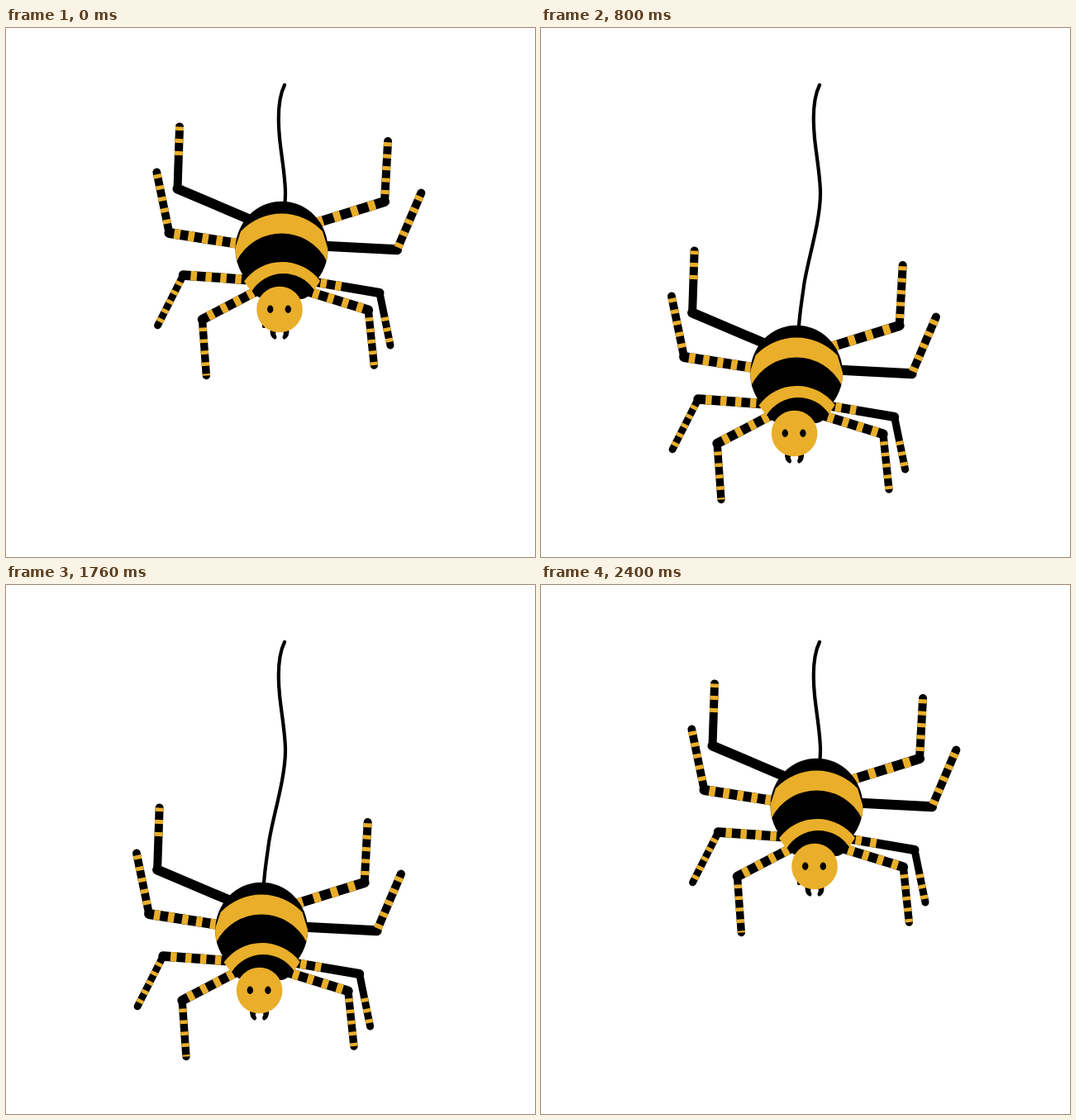
Recreate the animation shown at these times as an HTML page. Size 640 by 640 pixels, loop 2.48 s.

```html
<!DOCTYPE html>
<html lang="en">
<head>
<meta charset="utf-8">
<title>Spider on a thread</title>
<style>
html, body { margin: 0; width: 100%; height: 100%; overflow: hidden; background: #fff; }
svg { display: block; width: 100vw; height: 100vh; }
</style>
</head>
<body>
<svg viewBox="0 0 640 640">
  <path d="M337 69C329 85 329 112 331 133S338 180 338 200C338 235 322 283 318 312S313 345 312 361"
        fill="none" stroke="#000" stroke-width="4.2" stroke-linecap="round"/>
  <g id="spider">
    <g id="legs" fill="none" stroke-linejoin="round"></g>
    <clipPath id="round"><ellipse cx="333.5" cy="267.5" rx="56" ry="57.8"/></clipPath>
    <ellipse cx="333.5" cy="267.5" rx="56" ry="57.8"/>
    <path d="M297 318A45 45 0 0 1 373 317Q367 326 358 328L306 326Z"/>
    <g fill="#e9ae2a">
      <path clip-path="url(#round)" d="M284 246A68 68 0 0 1 383 246L394 282H388A61 61 0 0 0 279 282H272Z"/>
      <path d="M288 306.5A57 57 0 0 1 380 306L373 317A45 45 0 0 0 297 319Z"/>
    </g>
    <g stroke="#000" stroke-width="1.4" stroke-linejoin="round">
      <path id="fangL" d="M320.5 364Q319 373 325.5 376Q328 374.5 325.5 371L326 364Z"/>
      <path id="fangR" d="M341.5 364Q343 373 336.5 376Q334 374.5 336.5 371L336 364Z"/>
    </g>
    <circle cx="331" cy="340.5" r="27.8" fill="#e9ae2a"/>
    <ellipse cx="319.7" cy="340.2" rx="3.7" ry="4.7"/>
    <ellipse cx="341.3" cy="340.2" rx="3.7" ry="4.7"/>
  </g>
</svg>
<script>
const STEP = 80, LOOP = 2480, LAST = 30, DROP = 150, YELLOW = "#e9ae2a";
const $ = id => document.getElementById(id);

// hip, knee, tip, swing in radians, widths, stripes [start, period, width, count] from the knee
const legs = [
  { hip: [299.5, 233.5], knee: [207.5, 194.5], tip: [210, 119.5], swing: .05, w: [12, 10], shin: [40.5, 15, 5, 3] },
  { hip: [281, 261], knee: [197.5, 248], tip: [182.3, 174.5], swing: .068, w: [12, 9.8], thigh: [6, 17.2, 7.5, 5], shin: [11.5, 14, 5, 5] },
  { hip: [283, 304], knee: [214.5, 299], tip: [183.5, 360], swing: .14, w: [11.5, 8.8], thigh: [9, 18, 7.5, 4], shin: [9, 12.5, 4.5, 5] },
  { hip: [297, 321.5], knee: [237.5, 352.5], tip: [242.3, 420.5], swing: -.09, w: [11.5, 9.4], thigh: [8, 18, 7.5, 4], shin: [10, 14, 4.5, 5] },
  { hip: [376.5, 235.5], knee: [458, 210], tip: [462, 137], swing: .097, w: [12, 10], thigh: [12, 22, 8.5, 4], shin: [9, 14.5, 5, 5] },
  { hip: [389.5, 264], knee: [473, 268.3], tip: [502.3, 199.5], swing: .07, w: [12, 10], shin: [3, 15.5, 5.5, 5] },
  { hip: [381.5, 308.5], knee: [452, 320.5], tip: [465, 384], swing: .04, w: [11, 9], thigh: [47, 18, 7.5, 2], shin: [30, 13, 4.5, 3] },
  { hip: [371.5, 320.5], knee: [438.3, 341.3], tip: [445.3, 408], swing: -.06, w: [11.5, 9.4], thigh: [7, 18.5, 7.5, 4], shin: [9, 13.5, 4.5, 5] }
];

function add(parent, tag, attrs) {
  const el = document.createElementNS("http://www.w3.org/2000/svg", tag);
  for (const k in attrs) el.setAttribute(k, attrs[k]);
  return parent.appendChild(el);
}

function segment(g, from, to, width, stripes) {
  const d = `M${from}L${to}`;
  add(g, "path", { d, stroke: "#000", "stroke-width": width, "stroke-linecap": "round" });
  if (!stripes) return;
  const [start, period, w, n] = stripes;
  const dash = `0 ${start} ` + `${w} ${period - w} `.repeat(n) + "0 999";
  add(g, "path", { d, stroke: YELLOW, "stroke-width": width, "stroke-dasharray": dash });
}

for (const leg of legs) {
  const { hip, knee, tip, w } = leg;
  const root = hip.map((v, i) => v + (v - knee[i]) * .1);
  leg.node = add($("legs"), "g", {});
  segment(leg.node, knee, root, w[0], leg.thigh);
  segment(leg.node, knee, tip, w[1], leg.shin);
}

const clamp = v => Math.max(0, Math.min(1, v));
const smooth = v => (v = clamp(v)) * v * (3 - 2 * v);
const turn = (el, deg, x, y) => el.setAttribute("transform", `rotate(${deg} ${x} ${y})`);

function draw(ms) {
  const i = Math.min(LAST, Math.floor((ms % LOOP) / STEP));

  // drop, hang, climb back; the path bows to the left
  const v = Math.min(smooth(i / 4.35), smooth((LAST - i) / 4.67));
  const q = 1 - clamp(v / .4);
  const dx = -26 * (1 - q * q) + 1.6 * clamp((v - .4) / .6);
  $("spider").setAttribute("transform", `translate(${dx} ${DROP * v})`);

  // legs swing once every six steps
  const c = Math.cos((i + 1) * Math.PI / 3);
  const s = c * (1.05 - .15 * c * c) - .5;
  for (const { node, hip, swing } of legs) turn(node, s * swing * 180 / Math.PI, ...hip);
  turn($("fangL"), -s * 8, 323, 362);
  turn($("fangR"), s * 8, 339, 362);
}

function tick() {
  draw(performance.now());
  requestAnimationFrame(tick);
}
tick();
</script>
</body>
</html>
```
